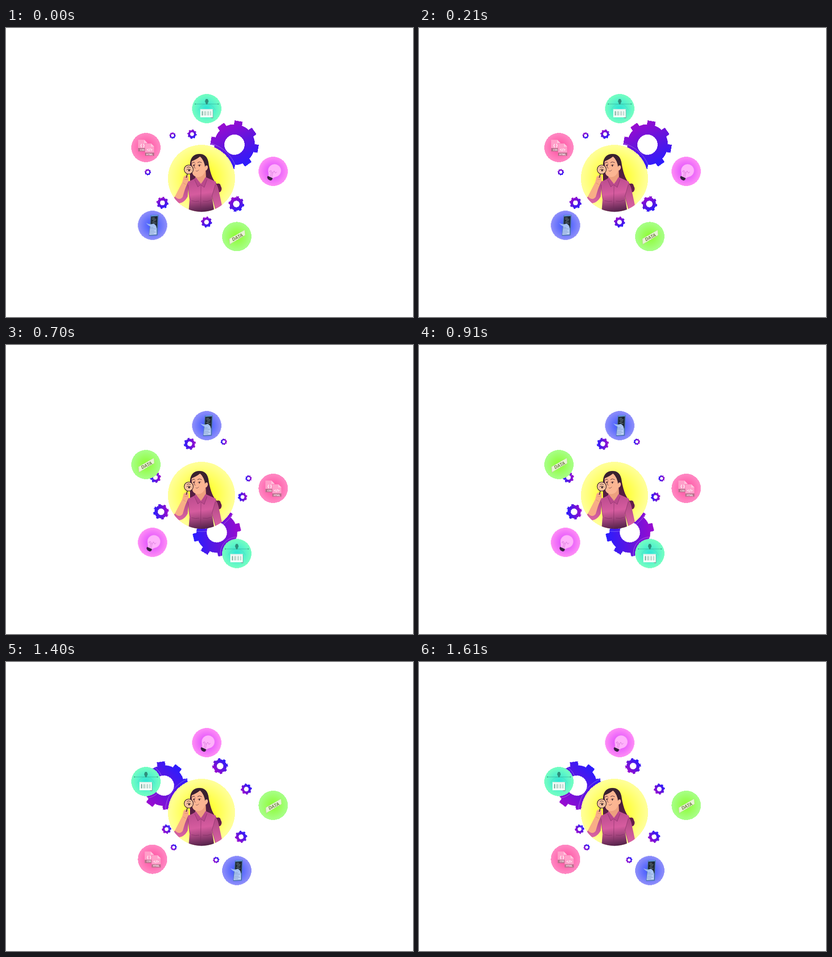
These frames come from a looping animation (887 by 631 pixels, 1750 ms). An HTML page:

```html
<!DOCTYPE html>
<html lang="en">
<head>
<meta charset="utf-8">
<title>Gears and topics</title>
<style>
  html, body { margin: 0; width: 100%; height: 100%; overflow: hidden; background: #fff; }
  svg { display: block; width: 100%; height: 100%; }
  .disc, .gear { shape-rendering: crispEdges; }
  .gear { fill: url(#gearFill); fill-rule: evenodd; }
  .halo { fill: none; stroke: #fff; stroke-opacity: .5; stroke-width: .7; }
  text { font-family: "Open Sans", sans-serif; font-weight: 700; text-anchor: middle; }

  #gears { animation: turn 1750ms step-end infinite; }
  @keyframes turn {
    0%, 100% { transform: translate(498px, 254.7px); }
    20% { transform: translate(517.3px, 349.5px) rotate(60.5deg); }
    40% { transform: translate(459.5px, 409px) rotate(112deg); }
    60% { transform: translate(359px, 387px) rotate(176.5deg); }
    80% { transform: translate(344.2px, 269.8px) rotate(252.6deg); }
  }

  .bubble { animation: orbit 1750ms step-end infinite; animation-delay: calc(var(--slot) * -350ms); }
  @keyframes orbit {
    0%, 100% { transform: translate(437.5px, 176px); }
    20% { transform: translate(582.3px, 313px); }
    40% { transform: translate(503px, 455.3px); }
    60% { transform: translate(319.3px, 430.7px); }
    80% { transform: translate(305px, 261px); }
  }
</style>
</head>
<body>
<svg viewBox="0 0 887 631">
  <defs>
    <linearGradient id="gearFill" x1=".28" y1=".06" x2=".72" y2=".94">
      <stop offset="0" stop-color="#9a0bd0"/><stop offset=".5" stop-color="#6015de"/><stop offset="1" stop-color="#2a1cff"/>
    </linearGradient>
    <radialGradient id="yellow"><stop offset=".3" stop-color="#ffff30"/><stop offset="1" stop-color="#ffff9c"/></radialGradient>
    <radialGradient id="teal"><stop offset=".1" stop-color="#35e6d4"/><stop offset="1" stop-color="#76ffc2"/></radialGradient>
    <radialGradient id="violet"><stop offset=".1" stop-color="#dd48ff"/><stop offset="1" stop-color="#ff8ef6"/></radialGradient>
    <radialGradient id="green"><stop offset=".1" stop-color="#8efc38"/><stop offset="1" stop-color="#a8ff8a"/></radialGradient>
    <radialGradient id="blue"><stop offset=".1" stop-color="#4058ff"/><stop offset="1" stop-color="#9090fa"/></radialGradient>
    <radialGradient id="pink"><stop offset=".1" stop-color="#ff50a0"/><stop offset="1" stop-color="#ff8ac4"/></radialGradient>
    <linearGradient id="shirt" gradientUnits="userSpaceOnUse" x1="418" y1="325" x2="429" y2="401">
      <stop offset="0" stop-color="#b84a8c"/><stop offset=".48" stop-color="#d65c9f"/>
      <stop offset=".7" stop-color="#a5467f"/><stop offset="1" stop-color="#54224a"/>
    </linearGradient>
    <linearGradient id="sleeve" x1="0" y1="0" x2="0" y2="1">
      <stop offset="0" stop-color="#a9447f"/><stop offset="1" stop-color="#dc64a5"/>
    </linearGradient>
    <linearGradient id="hair" x1="0" y1="0" x2="0" y2="1">
      <stop offset="0" stop-color="#35202f"/><stop offset="1" stop-color="#6b1c50"/>
    </linearGradient>
    <linearGradient id="page" x1="0" y1="0" x2="0" y2="1">
      <stop offset="0" stop-color="#9cbcf0"/><stop offset="1" stop-color="#c4d6f8"/>
    </linearGradient>
    <clipPath id="portrait"><circle cx="426" cy="328.3" r="73.2"/></clipPath>
  </defs>

  <g id="gears"></g>
  <circle class="halo" cx="426" cy="328.3" r="79"/>
  <circle class="disc" cx="426" cy="328.3" r="73.2" fill="url(#yellow)"/>

  <g clip-path="url(#portrait)">
    <!-- back hair -->
    <path fill="url(#hair)" d="M401 332V296Q403 275 422 275Q437 275 441 292C444 312 449 330 459 340Q467 338 468 345Q472 351 468 357Q463 361 457 357L440 345H402Z"/>
    <!-- neck and face -->
    <path fill="#eda07e" d="M415 318L435 305L436 328L425 342L412 329Z"/>
    <path fill="#fbb592" d="M404.5 292Q407 284 421 280Q432 284 434 301Q440 298 440 305Q438 312 434 311Q431 325 418 325.5Q407 325 405.5 314Z"/>
    <path fill="#39212f" d="M402 297Q403 277 421 275.5Q437 276 441 298L437 300Q434 300 434 304Q432 289 423 280.5Q415 287 404.5 291Z"/>
    <g fill="none" stroke="#4a2637" stroke-linecap="round">
      <path stroke-width="1.1" d="M418 294Q421 291 426 294M406 295Q408 292 411 293.5"/>
      <path stroke-width=".7" d="M412 296L410 305L413 306M414 312Q417 314 420 310M418 300Q421 297 425 299M407 300Q409 297.5 411 299"/>
    </g>
    <ellipse cx="421.5" cy="300.5" rx="1.3" ry="1.9" fill="#33202b"/>
    <ellipse cx="409.3" cy="300.3" rx="1" ry="1.7" fill="#33202b"/>
    <!-- shirt -->
    <path fill="url(#sleeve)" d="M448 334Q460 337 463 352L471 389L457 397L449 368Z"/>
    <path fill="url(#sleeve)" d="M399 333L396 368Q388 383 374 383Q363 381 364 373L369 367Q379 373 385 364L395 339Z"/>
    <path fill="url(#shirt)" d="M396 336Q406 332 414 327L425 340L436 326Q450 332 458 336L449 367L454 402H398L400 375Z"/>
    <path fill="#b9488b" d="M414 326L424 342L418 347L411 331ZM435 325L438 331L432 348L425 342Z"/>
    <path fill="none" stroke="#74285c" stroke-width=".6" d="M425 343L424 401M411 331L418 347L424 342L432 348L438 331M397 342Q398 362 401 375M456 342L449 367L457 397M404 377Q413 380 421 378M429 378Q439 380 447 376"/>
    <!-- forearm and hand -->
    <path fill="#f8ad86" d="M368 368L384 337L387 325Q392 319 398 324L398 334L393 342L385 369Q378 378 368 368Z"/>
    <path fill="none" stroke="#c77b60" stroke-width=".6" d="M389 327L395 325M389 331L397 330M392 342L386 338"/>
    <!-- magnifier -->
    <path stroke="#3b2932" stroke-width="1.8" d="M395 319L393 327"/>
    <circle cx="398.2" cy="309" r="9.9" fill="#f9c29e" stroke="#35232b" stroke-width="1.3"/>
    <path fill="none" stroke="#35232b" stroke-width="1" d="M394 305Q398 301.5 402.5 305.5M393.5 310Q398 305.5 403.5 310.5"/>
    <circle cx="399" cy="311" r="1.9" fill="#2b1c24"/>
  </g>

  <g class="bubble" style="--slot:0">
    <circle class="halo" r="36"/><circle class="disc" r="32" fill="url(#teal)"/>
    <path fill="none" stroke="#36a28d" stroke-width=".7" d="M-25 -10H25"/>
    <path fill="none" stroke="#36a28d" stroke-opacity=".35" stroke-width=".6" d="M-19 4Q-14 -9 0 -10Q14 -9 19 4"/>
    <path fill="#2f8f7c" d="M-2 -21H2L4 -16L1 -9H-1L-4 -16Z"/>
    <circle cx="-25" cy="-10" r="1.1" fill="#258b78"/><circle cx="25" cy="-10" r="1.1" fill="#258b78"/>
    <path fill="#74ad9f" d="M-12 2H14V21H10L8 19H-12Z"/>
    <path fill="#f8fffc" d="M-14 1H13V19H-14Z"/>
    <path fill="#dcebe5" d="M-13 1.5H12.5V3.5H-13Z"/>
    <path fill="#c2d9d1" d="M-6 5.5H-1V15H-6ZM1 5.5H5V15H1ZM7 5.5H10V15H7Z"/>
    <path fill="#8fb8ab" d="M-11 5.5H-8V15H-11Z"/>
  </g>

  <g class="bubble" style="--slot:1">
    <circle class="halo" r="36"/><circle class="disc" r="32" fill="url(#violet)"/>
    <path fill="#ffb2fb" d="M-10 11Q-10 5 -11 -1A14 14 0 1 1 6 12Q1 13 -1 16Z"/>
    <path fill="none" stroke="#c65ccd" stroke-width=".7" d="M-6 12L-4 3L-8 0L-5 -2L-1 4L2 -1L5 4L8 1M-1 4L-3 13"/>
    <path fill="#21152a" d="M-12 10L-1 15L-3 19L-6 20L-11 17.5L-13 13.5Z"/>
    <path stroke="#7a4a83" stroke-width=".6" d="M-12 12.5L-2 17M-11 15.5L-4 18.5"/>
  </g>

  <g class="bubble" style="--slot:2">
    <circle class="halo" r="36"/><circle class="disc" r="32" fill="url(#green)"/>
    <path fill="#b4c69b" d="M-17 6L-15 5L-13 17L-15 18Z"/>
    <path fill="#e9f3d6" stroke="#c9d9a9" stroke-width=".6" d="M-16 5L17 -14L18 -3L-15 16.5Z"/>
    <text transform="translate(2.5 4.8) rotate(-26) skewX(-8)" font-size="10" fill="#74834c">DATA</text>
  </g>

  <g class="bubble" style="--slot:3">
    <circle class="halo" r="36"/><circle class="disc" r="32" fill="url(#blue)"/>
    <path fill="#4a74ab" d="M-4 -22L13 -23L11 22L-8 23Z"/>
    <path fill="#1c2630" d="M-3 -19L11 -20L10 6L-4 0Z"/>
    <path fill="url(#page)" d="M-14 -5Q-5 0 2 -4Q9 -1 9 8L9 20L-7 21L-5 2Q-9 1 -14 -5Z"/>
    <path fill="none" stroke="#a9c0c2" stroke-width=".8" d="M-1 -16H5M-1 -13H8M1 -10H7M-1 -7H4M3 -5H8"/>
    <path fill="none" stroke="#6686b9" stroke-width=".8" d="M-5 5H2M-5 8H7M-5 12H4M-6 15H7M-6 18H3"/>
    <path stroke="#6caaf5" stroke-width="1.5" d="M-3 -20.5L12 -21.5"/>
  </g>

  <g class="bubble" style="--slot:4">
    <circle class="halo" r="36"/><circle class="disc" r="32" fill="url(#pink)"/>
    <path fill="#ff9fc9" d="M-17 -17H-4L3 -10V8H-17Z"/><path fill="#ffc5df" d="M-4 -17V-10H3Z"/>
    <path fill="#b96f8c" d="M-17 1H0V8.5H-17Z"/>
    <text x="-7.5" y="-2" font-size="9" fill="#fff">{ }</text>
    <text x="-8" y="6.8" font-size="5.5" fill="#fff">CSS</text>
    <path fill="#ff9fc9" stroke="#f76ca9" stroke-width=".5" d="M-2 -9H11L18 -2V18H-2Z"/><path fill="#ffc5df" d="M11 -9V-2H18Z"/>
    <path fill="#b96f8c" d="M-2 11H18V18H-2Z"/>
    <text x="8" y="8" font-size="8" fill="#fff">&lt;/&gt;</text>
    <text x="8" y="16.5" font-size="5" fill="#fff">HTML</text>
  </g>
</svg>
<script>
  const polar = (radius, degrees) => {
    const angle = degrees * Math.PI / 180;
    return `${(radius * Math.cos(angle)).toFixed(2)} ${(radius * Math.sin(angle)).toFixed(2)}`;
  };

  function gearPath(radius) {
    const body = radius * .84, hole = radius * .415;
    let path = '';
    for (let tooth = 0; tooth < 8; tooth++) {
      const angle = 10 + tooth * 45;
      path += `${tooth ? `A${body} ${body} 0 0 1 ` : 'M'}${polar(body, angle - 11.5)}`
        + `L${polar(radius, angle - 9.5)}L${polar(radius, angle + 9.5)}L${polar(body, angle + 11.5)}`;
    }
    return `${path}A${body} ${body} 0 0 1 ${polar(body, -1.5)}Z`
      + `M${hole} 0A${hole} ${hole} 0 1 0 ${-hole} 0A${hole} ${hole} 0 1 0 ${hole} 0Z`;
  }

  // x, y, radius, relative to the largest gear
  const gears = [
    [0, 0, 53], [4, 129.5, 17.2], [-61, 169, 12], [-157, 127, 13.2],
    [-189, 60, 7], [-135, -20, 7], [-92.5, -23, 10.3]
  ];
  document.getElementById('gears').innerHTML = gears.map(([x, y, radius]) =>
    `<path class="gear" transform="translate(${x} ${y})" d="${gearPath(radius)}"/>`).join('');
</script>
</body>
</html>
```
